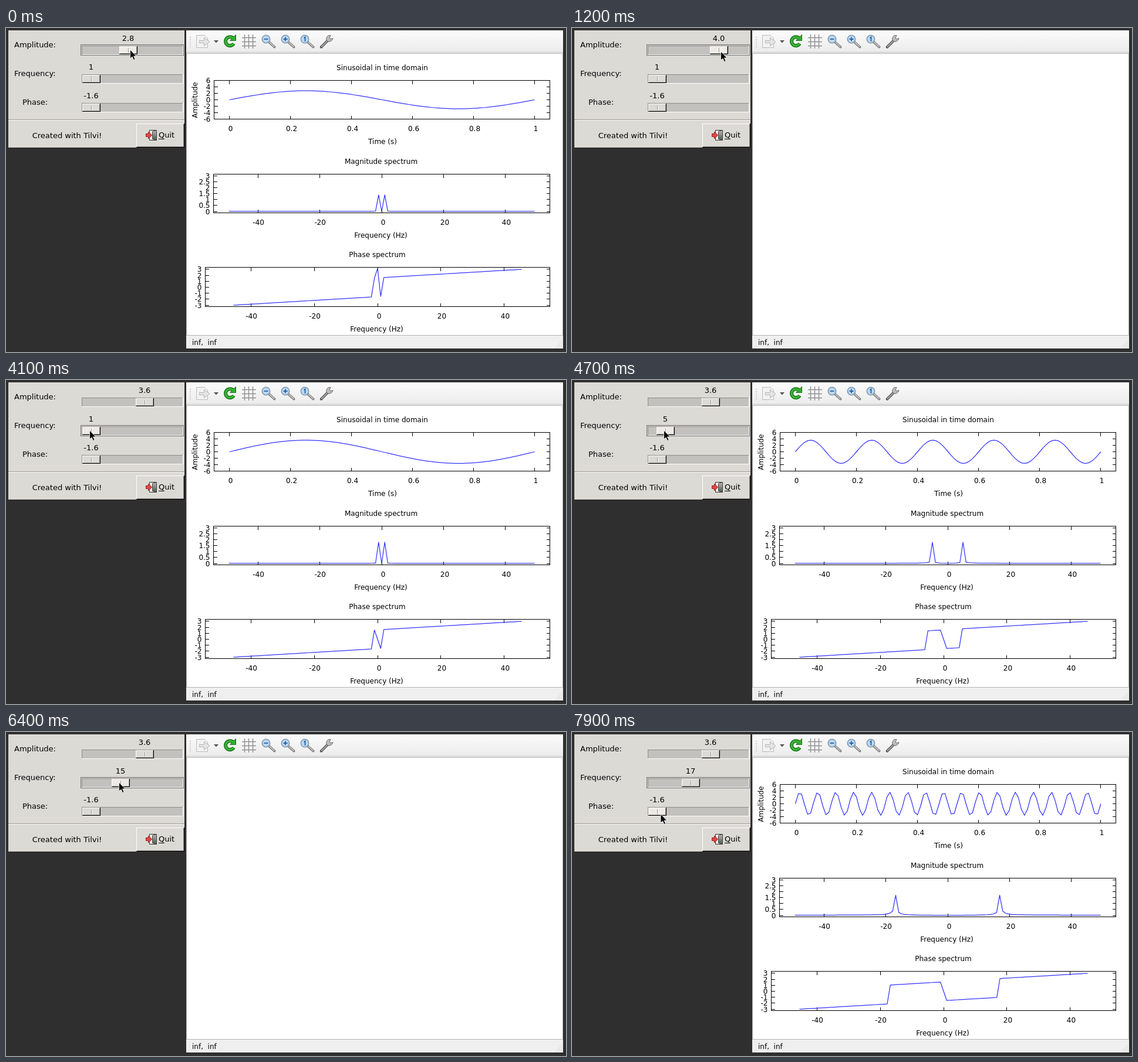
These frames come from a looping animation (954 px wide and 553 px high, 8000 ms). An HTML page:

```html
<!DOCTYPE html>
<html lang="en">
<head>
<meta charset="utf-8">
<title>Sinusoid explorer</title>
<style>
html, body { margin: 0; width: 100%; height: 100%; overflow: hidden; background: #2f2f2f; }
svg { display: block; font: 12px "DejaVu Sans", sans-serif; }
text { white-space: pre; }
.ui { font-size: 13px; }
.mid { text-anchor: middle; }
.end { text-anchor: end; }
.crisp { shape-rendering: crispEdges; }
.curve { fill: none; stroke: #3434ff; stroke-width: 1.25; stroke-linejoin: round; }
</style>
</head>
<body>
<svg id="stage" width="954" height="553" viewBox="0 0 954 553"></svg>
<script>
const stage = document.getElementById('stage');
const N = 101, RATE = 100;

const range = (a, b, step = 1) =>
  Array.from({ length: Math.round((b - a) / step) + 1 }, (_, i) => +(a + i * step).toFixed(1));
const rect = (x, y, w, h, fill, more = '') =>
  `<rect class="crisp" x="${x}" y="${y}" width="${w}" height="${h}" fill="${fill}" ${more}/>`;
const path = (d, stroke, width = 1, fill = 'none', more = '') =>
  `<path d="${d}" stroke="${stroke}" stroke-width="${width}" fill="${fill}" ${more}/>`;
const label = (x, y, s, cls = '', more = '') => `<text x="${x}" y="${y}" class="${cls}" ${more}>${s}</text>`;
const round = 'stroke-linecap="round"';

// Control panel
const rowY = i => 30 + 49 * i;

// Raised box: black and grey edges below, white above
const raised = (x, y, w, h, id) => rect(x, y, w, h, '#000') + rect(x, y, w - 1, h - 1, '#fff') +
  rect(x + 1, y + 1, w - 2, h - 2, '#96948f') + rect(x + 1, y + 1, w - 3, h - 3, '#dcdad5', id && `id="${id}"`);

function slider(i) {
  const y = rowY(i);
  return rect(129, y, 173, 16, '#fff') + rect(129, y, 172, 15, '#8e8c87') + rect(130, y + 1, 171, 14, '#c3c1bd') +
    `<g id="handle${i}">` + raised(0, y + 1, 31, 14, 'face' + i) +
    rect(15, y + 4, 1, 8, '#96948f') + rect(16, y + 4, 1, 8, '#fff') + '</g>' +
    label(0, y - 8, '', 'ui mid', `id="value${i}"`);
}

function panel() {
  return rect(4, 4, 300, 200, '#dcdad5') +
    label(14, 33, 'Amplitude:', 'ui') + label(14, 82, 'Frequency:', 'ui') + label(28, 131, 'Phase:', 'ui') +
    range(0, 2).map(slider).join('') +
    path('M127.5 28.5h175v18h-175z', '#000', 1, 'none', 'id="focus" stroke-dasharray="1 1"') +
    rect(4, 156, 300, 1, '#96948f') + rect(4, 157, 300, 1, '#fff') +
    label(104, 188, 'Created with Tilvi!', 'ui mid') + raised(222, 163, 82, 41) +
    rect(244, 174, 13, 18, '#333') + rect(245, 175, 11, 16, '#eee') +
    path('M249.5 176.5l7-2v17l-7-2z', '#444', 1, 'url(#door)') +
    path('M238.5 180.5h4v-3.5l6 6-6 6v-3.5h-4z', '#a01717', 1, '#e04848') +
    label(260, 187, 'Quit', 'ui') + rect(260, 189, 10, 1, '#000');
}

// Plot window
function lens(x, sign) {
  return path(`M${x + 5} 24l9.5 8.5`, '#777', 4, 'none', round) +
    path(`M${x + 6} 24.5l8 7.5`, '#d8d8d8', 1.6, 'none', round) +
    `<circle cx="${x}" cy="19" r="6.7" fill="#b9d8f3" stroke="#8498ab" stroke-width="1.6"/>` +
    path(sign, '#2b62a8', 1.8);
}

function toolbar() {
  const arc = 'M387 17.5a7.5 7.5 0 1 0 1 9';
  return rect(307, 4, 642, 38, 'url(#bar)') +
    range(15, 31, 4).map(y => rect(313, y, 2, 2, '#cfcfcf')).join('') +
    path('M324.5 12.5h14l5 5v16h-19z', '#bbb', 1, '#f2f2f2') +
    path('M329.5 21.5h8v-5l9.500 7-9.500 7v-5h-8z', '#b4b4b4', 1, '#e6e6e6') +
    path('M354 21h8l-4 4.5z', 'none', 0, '#555') +
    path(arc, '#157915', 6) + path('M391.5 11.5v10h-10z', '#157915', 1, '#35a835') + path(arc, '#3db53d', 3) +
    range(0, 2).map(i => path(`M${406.5 + 7 * i} 11v24M402 ${16.5 + 7 * i}h24`, '#909090', 1.4)).join('') +
    lens(443, 'M439.5 19h7') + lens(476, 'M472.5 19h7m-3.5-3.5v7') + lens(509, 'M507.5 17l2-1.5v7.5') +
    path('M537 32.5l10-10', '#444', 4.5, 'none', round) + path('M537.5 32l10-10', '#aaa', 2.2, 'none', round) +
    path('M553 12.5c-5-.5-8 3-7 8 2 4 9 4 11-3l-4 1.500-2-2z', '#666', 1, '#bdbdbd');
}

function windowFrame() {
  const grip = range(0, 3).map(i => range(0, i).map(j => rect(946 - j * 3, 535 + i * 3, 1, 1, '#b8b8b8')).join(''));
  return rect(307, 4, 642, 543, '#efefef') + toolbar() + rect(307, 41, 642, 1, '#c6c6c6') +
    rect(307, 43, 642, 482, '#b5b5b5') + rect(308, 44, 640, 480, '#fff') +
    label(317, 541, 'inf,  inf') + grip.join('');
}

// Each chart: its box and the scales from value to pixel
const axes = {
  time: { box: [354.5, 89.5, 926.5, 155.5], x: v => 380.5 + 520.4 * v, y: v => 122.5 - 5.5 * v },
  mag: { box: [353.5, 249.5, 926.5, 315.5], x: v => 640 + 5.261 * v, y: v => 313 - 20.2 * v },
  phase: { box: [339.5, 408.5, 926.5, 475.5], x: v => 633 + 5.39 * v, y: v => 442.5 - 10.2 * v }
};

function chart(name, title, titleX, xName, nameX, xs, ys) {
  const { box: [l, t, r, b], x, y } = axes[name];
  let ticks = '', s = '';
  for (const v of xs) {
    const px = Math.floor(x(v)) + .5;
    ticks += `M${px} ${b}v-6M${px} ${t}v6`;
    s += label(px + (v < 0 ? .5 : 2), b + 20.5, v, 'mid');
  }
  for (const v of ys) {
    const py = Math.floor(y(v)) + .5;
    if (py > t && py < b) ticks += `M${l} ${py}h6M${r} ${py}h-6`;
    s += label(l - 6, py + 4.5, v, 'end');
  }
  return s + path(`M${l} ${t}H${r}V${b}H${l}z` + ticks, '#000', 1, 'none', 'class="crisp"') +
    label(titleX, t - 17.5, title, 'mid') + label(nameX, b + 42.5, xName, 'mid') +
    `<polyline class="curve" id="${name}"/>`;
}

const hertz = range(-40, 40, 20);
stage.innerHTML = `<defs>
  <linearGradient id="bar" x2="0" y2="1"><stop stop-color="#fcfcfc"/><stop offset="1" stop-color="#ebebeb"/></linearGradient>
  <linearGradient id="door" x2="0" y2="1"><stop stop-color="#bbb"/><stop offset="1" stop-color="#4c5a44"/></linearGradient>
  </defs>` + panel() + windowFrame() + '<g id="plots">' +
  chart('time', 'Sinusoidal in time domain', 641, 'Time (s)', 641.5, range(0, 1, .2), range(-6, 6, 2)) +
  label(0, 0, 'Amplitude', 'mid', 'transform="translate(326 123) rotate(-90)"') +
  chart('mag', 'Magnitude spectrum', 639, 'Frequency (Hz)', 638.5, hertz, range(0, 3, .5)) +
  chart('phase', 'Phase spectrum', 632.5, 'Frequency (Hz)', 631.5, hertz, range(-3, 3)) + '</g>' +
  path('M0 0V15l3.500-3L6 17.500l2.500-1L6 11h4.500z', '#fff', .8, '#000', 'id="cursor"');

const el = id => document.getElementById(id);

// Signal
const wave = (amp, freq, n) => amp * Math.sin(2 * Math.PI * freq * n / RATE);

function magnitude(amp, freq, k) {
  let re = 0, im = 0;
  for (let n = 0; n < N; n++) {
    const v = wave(amp, freq, n), a = 2 * Math.PI * k * n / N;
    re += v * Math.cos(a);
    im -= v * Math.sin(a);
  }
  return Math.hypot(re, im) / N;
}

function phase(amp, freq, k) {
  if (!k) return amp < 2.85 ? Math.PI : 0;
  const m = Math.abs(k);
  return Math.sign(k) * (Math.PI * m / N + (m > freq ? 1 : -1) * Math.PI / 2);
}

function plot(name, ids, step, fn) {
  const { x, y } = axes[name];
  el(name).setAttribute('points', ids.map(i => x(i * step).toFixed(2) + ',' + y(fn(i)).toFixed(2)).join(' '));
}

// Motion
const ramp = (t, from, to) => Math.min(1, Math.max(0, (t - from) / (to - from)));
const ampAt = t => (2.8 + 1.5 * ramp(t, 0, 1500) - .7 * ramp(t, 1800, 2300)).toFixed(1);

// One smooth drag, then four short tugs
function freqAt(t) {
  const tugs = Math.min(4, Math.max(0, Math.floor((t - 5340) / 330)));
  return Math.round(1 + 10 * ramp(t, 4100, 5100) ** 2) + Math.floor(1.5 * tugs);
}

const ampX = amp => Math.round(95 + 35 * amp);
const freqX = freq => Math.round(126.3 + 3.57 * freq);

// The pointer holds a handle, or swings in an arc to the next one
function cursorAt(t) {
  const glide = ([ax, ay], [bx, by], u, sag) =>
    [ax + (bx - ax) * u, ay + (by - ay) * u + sag * Math.sin(Math.PI * u)];
  const onAmp = [ampX(ampAt(t)) + 18.5, 37 + 3 * ramp(t, 0, 900)];
  const onFreq = [freqX(freqAt(t)) + 12.5, 86];
  return t < 4100 ? glide(onAmp, onFreq, ramp(t, 2800, 3700), 30)
    : glide(onFreq, [151, 140], ramp(t, 7200, 7900), 80);
}

function setHandle(i, x, text, [cx, cy]) {
  const y = rowY(i), hover = cx >= x && cx < x + 31 && cy >= y && cy < y + 15;
  el('handle' + i).setAttribute('transform', `translate(${x} 0)`);
  el('face' + i).setAttribute('fill', hover ? '#eeebe7' : '#dcdad5');
  el('value' + i).setAttribute('x', x + 15);
  el('value' + i).textContent = text;
}

function draw(t) {
  const amp = ampAt(t), freq = freqAt(t), cursor = cursorAt(t);
  setHandle(0, ampX(amp), amp, cursor);
  setHandle(1, freqX(freq), freq, cursor);
  setHandle(2, 130, '-1.6', cursor);
  el('focus').setAttribute('transform', `translate(0 ${t < 4100 ? 0 : 49})`);
  el('cursor').setAttribute('transform', `translate(${cursor})`);

  // The plots flash blank now and then while a value changes
  const changed = amp !== ampAt(t - 100) || freq !== freqAt(t - 100);
  el('plots').style.display = changed && t % 400 === 0 ? 'none' : '';
  plot('time', range(0, 100), 1 / RATE, n => wave(amp, freq, n));
  plot('mag', range(-50, 50), RATE / N, k => magnitude(amp, freq, k));
  plot('phase', range(-46, 46), RATE / N, k => phase(amp, freq, k));
}

const start = performance.now();
let last = 0;
draw(0);
function tick(now) {
  const t = Math.floor(Math.max(0, now - start) % 8000 / 100) * 100;
  if (t !== last) draw(last = t);
  requestAnimationFrame(tick);
}
requestAnimationFrame(tick);
</script>
</body>
</html>
```
